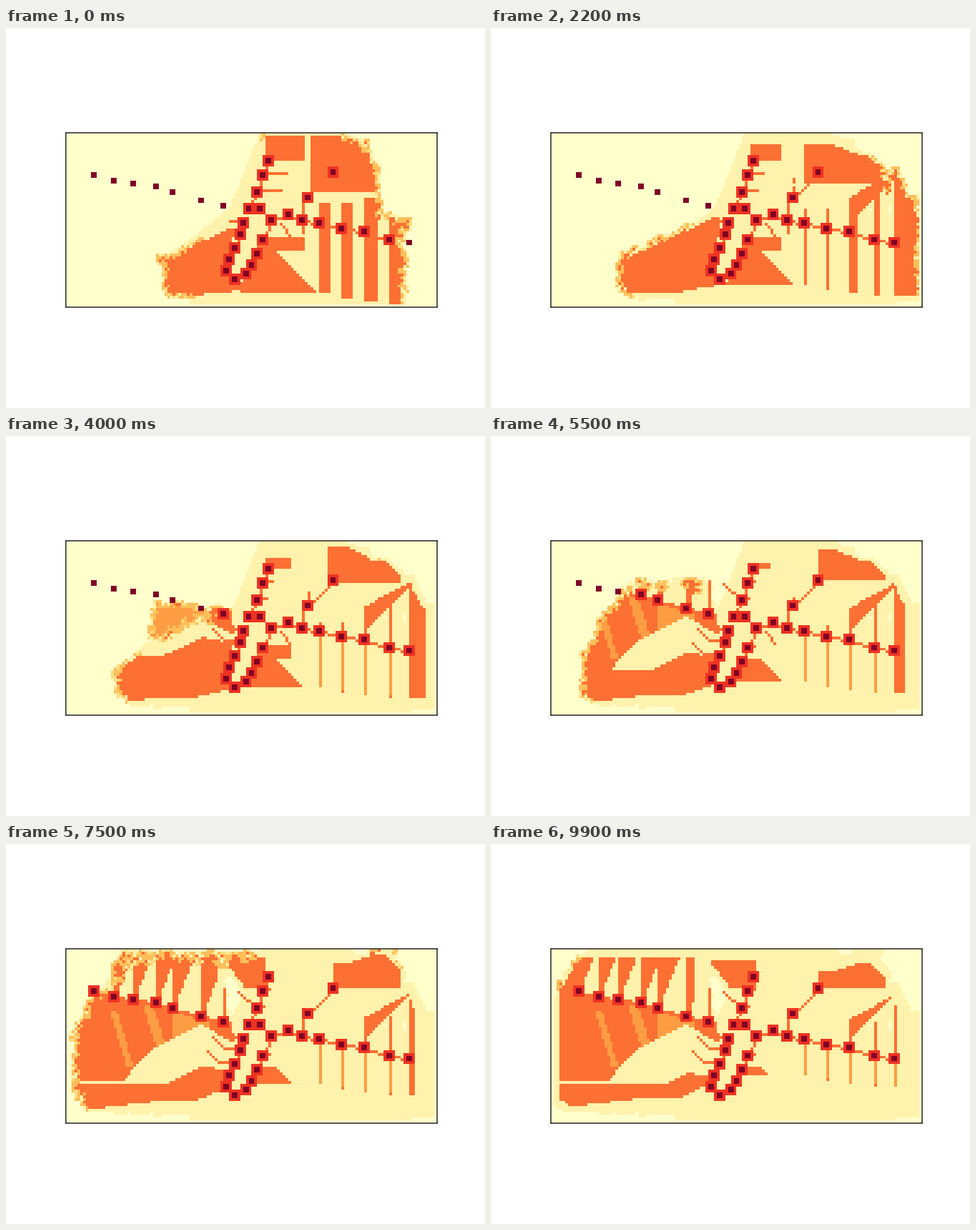
These frames come from a looping animation (840 px wide and 667 px high, 10 s). A matplotlib script:

```python
import matplotlib.pyplot as plt
import numpy as np
from matplotlib.animation import FuncAnimation

ROWS, COLS, FRAMES = 62, 132, 100
TRAIL, HALO, RIM, VEIN, BODY, RING, FOOD = 0.09, 2 / 9, 3 / 9, 4 / 9, 5 / 9, 0.69, 1
ERODE = 0.12  # cells per frame lost at a retreating edge

ROW, COL = np.mgrid[:ROWS, :COLS] + 0.5
interp, clip = np.interp, np.clip

# food sources: column and row of the upper left cell, in chain order
WEST = [(9, 14), (16, 16), (23, 17), (31, 18), (37, 20), (47, 23), (55, 25)]
NORTH = [(71, 9), (69, 14), (67, 20), (64, 26), (68, 26), (72, 30)]
LOOP = [(62, 31), (61, 35), (59, 40), (57, 44), (56, 48), (59, 51), (63, 49),
        (65, 46), (67, 42), (69, 37), (72, 30), (78, 28), (83, 30)]
EAST = [(89, 31), (97, 33), (105, 34), (114, 37), (121, 38)]
SPUR = [(85, 22), (94, 13)]
CHAINS = WEST, NORTH, LOOP + EAST, SPUR
NODES = sum(CHAINS, [])

STRIPE_TOPS = 25, 25, 23, 17, 11
STRIPE_WIDTHS = 3.6, 4, 5.5, 4.5, 11


def found(node):
    """Frame at which the organism reaches a food source."""
    if node in WEST:
        return 36 + 0.78 * (55 - node[0])
    return 5 if node == EAST[-1] else 0


def grow(mask):
    """Mask widened by one cell in all eight directions."""
    p = np.pad(mask, 1)
    tall = p[:-2] | p[1:-1] | p[2:]
    return tall[:, :-2] | tall[:, 1:-1] | tall[:, 2:]


def hollow_roof(c):
    return interp(c, [20, 30, 48, 59], [47.5, 36, 27, 33])


def west_lobe(c, r, t):
    """Foraging lobe on the left: whole sweep, and what is left of it."""
    retreat = max(0, 0.15 * (t - 85))
    left = max(34 - 0.4 * t, 1) + retreat
    top = max(14 - 0.6 * (t - 55), 1) + retreat

    age = t - clip((34 - c) / 0.4, 0, 85)
    floor = 57.8 - 0.05 * age - clip(c - 46, 0, None) * (0.1 + 0.004 * t)
    floor = floor - 0.8 * clip(4 - (c - left), 0, 4)
    end = interp(r, [35, 48, 53], [60, 56.5, 63])
    arm = (c > left) & (c < end) & (r < floor) & (r > clip(45 - 0.45 * (c - left), 30, 45))

    slant = left + 0.6 * clip(40 - 0.57 * (t - 55) - r, 0, None)
    chain = interp(c, *zip(*WEST)) + 1
    edge = np.where(r < chain, 57 - 0.13 * (t - 55), 59)
    dome = (c > slant) & (c > 57 - 3.2 * (t - 32)) & (c < edge) & (r > top) & (r < floor)
    sweep = arm | dome

    kept = (r > chain) | (c < 10)
    for n, m in WEST[:-1]:
        kept |= (c > n + 1) & (c < n + 2 + 0.4 * (m - r))
    if t >= 32:
        base = interp(c, [20, 35, 49, 59], [47.5, 47.5, 41, 43])
        base = np.minimum(base + 0.1 * (t - 68) - 0.4 * max(0, 50 - t), 47.5)
        kept &= (r < hollow_roof(c)) | (r > base)

    crest = (c > 69 - 0.75 * (21 - r)) & (c < min(73, 69 + 0.3 * (t - 68)))
    crest &= (r > top + 0.5) & (r < 14.5) & (t > 50)
    return sweep | crest, sweep & kept | crest


def inner_patches(c, r, t):
    """Remains around the loop, worn away from their free edges."""
    worn = ERODE * t
    patch = (c > 70.5) & (c < 85 - worn) & (r > 1 + worn) & (r < 10)
    left = interp(r, [37, 50, 57], [70, 64, 62])
    right = np.where(r < 42, 85 - worn, 77.5 + r - 45)
    wedge = (c > left) & (c < right) & (r < 57 - worn)
    return patch | wedge & (r > 37 + clip((t - 40) / 3, 0, 5))


def east_lobe(c, r, t):
    left, right = min(95, 87 + 0.14 * t), min(111 + 0.3 * t, 119)
    old_top = interp(t, [0, 30, 42, 99], [1, 5, 1, 8])
    new_top = interp(t, [0, 22, 55, 75, 99], [7, 8, 7, 2, 5])
    top = interp(c, [100, 110], [old_top, new_top]) + clip(c - right + 5, 0, 5)
    return (c > left) & (c < right) & (r > top) & (r < max(14, 21 - 0.15 * t))


def stripe_span(i, t):
    top = STRIPE_TOPS[i] + 0.1 * t + (0.6 * max(0, 22 - t) if i > 2 else 0)
    return min(top, EAST[i][1] - 1), 61 - 0.25 * (4 - i) ** 2 - ERODE * t


def stripes(c, r, t):
    body = np.zeros(c.shape, bool)
    for i, (n, _) in enumerate(EAST):
        top, bottom = stripe_span(i, t)
        width, lean = max(1, STRIPE_WIDTHS[i] - ERODE * t), 0
        if i == 4:
            width, lean = min(width, 0.6 * (t - 4)), 1.7
        x = c - n - 1
        body |= (x > 0) & (x < width) & (r > top + lean * x) & (r < bottom)
    x = c - 106
    band = (r > 23.5 - 0.55 * x + 0.03 * (t - 40)) & (r < 33 - x)
    return body | band & (x > 0) & (x < min(16, t - 5))


def stroke(grid, a, b, value=BODY):
    n = int(max(abs(b[0] - a[0]), abs(b[1] - a[1]))) + 1
    c = np.rint(np.linspace(a[0], b[0], n)).astype(int)
    r = np.rint(np.linspace(a[1], b[1], n)).astype(int)
    grid[r, c] = value


def draw_strands(grid, t):
    for i, (n, m) in enumerate(EAST):
        if i == 4 and t < 12:
            continue
        top, bottom = map(int, stripe_span(i, t))
        grid[top:bottom, n + 1] = BODY
        if t > (90 if i == 4 else 30):
            grid[m + 2:bottom, n + 1] = VEIN

    for n, m in (NORTH[1], NORTH[2], LOOP[9]):
        stroke(grid, (n + 2, m), (n + 2 + max(1, 7 - ERODE * t), m))
    for n, m in LOOP[:2]:
        stroke(grid, (n - 4, m), (n, m))
    if t >= 40:
        for n, m in LOOP[:3]:
            stroke(grid, (n - 9, m - 4), (n - 5, m))
            stroke(grid, (n - 5, m), (n, m))
    stroke(grid, (84, 24), (84, 31 if t > 35 else 35))
    if t < 60:
        stroke(grid, (76, 32), (79, 36))
    if 10 < t < 60:
        stroke(grid, (86, 14 + 0.1 * t), (86, 22))
    if t >= 55:
        stroke(grid, (61, 15), (67, 20))
        stroke(grid, (56, 14), (56, 25))


def draw_network(grid, t):
    draw_strands(grid, t)
    for chain in CHAINS:
        for a, b in zip(chain, chain[1:]):
            if t >= max(found(a), found(b)) and (chain is not SPUR or t > 12):
                stroke(grid, np.add(a, 1), np.add(b, 1))
    for n, m in NODES:
        if t >= found((n, m)):
            grid[m - 1:m + 3, n - 1:n + 3] = RING
    for n, m in NODES:
        grid[m:m + 2, n:n + 2] = FOOD


def vein_mask(t):
    roof = hollow_roof(COL)
    below = ROW > interp(COL, *zip(*WEST)) + 2
    if t < 46:
        return below & (COL > 30) & (COL < 52) & (ROW < roof)
    drift = COL - 0.3 * (ROW - 20)
    streak = (drift > 15) & (drift < 17.5) & (ROW > 22) & (ROW < 42)
    streak |= (drift > 27.5) & (drift < 31)
    fan = (COL > 38) & (COL < 51)
    return below & (ROW < roof) & (streak | fan)


def warp_field(rng):
    """Coarse bumps plus fine grain, in cells."""
    coarse = rng.normal(size=(ROWS, COLS))
    for axis in (0, 1, 0, 1):
        coarse = sum(np.roll(coarse, s, axis) for s in (-1, 0, 1)) / 3
    return coarse / coarse.std() * 0.8 + rng.uniform(-0.7, 0.7, (ROWS, COLS))


def simulate():
    rng = np.random.default_rng(7)
    dx, dy = warp_field(rng), warp_field(rng)
    trail = COL > interp(ROW, [0, 10, 27, 33, 45, 60], [69, 65, 58, 50, 35, 44])
    trail &= COL < interp(ROW, [0, 5, 14, 28, 31, 60], [100, 101, 112, 112, 119, 121])
    settled = ~grow(grow(~trail))
    inside = (ROW < ROWS - 1) & (COL > 1) & (COL < COLS - 1)
    trail &= inside

    history, frames = [], []
    for t in range(FRAMES):
        old = settled | history[t - 8] if t >= 8 else settled
        c, r = np.where(old, COL, COL + dx), np.where(old, ROW, ROW + dy)
        sweep, west = west_lobe(c, r, t)
        body = west | inner_patches(c, r, t) | east_lobe(c, r, t) | stripes(c, r, t)
        body &= inside
        reach = grow(body) & inside
        trail = trail | reach | sweep & inside
        history.append(trail)

        chance = rng.random((ROWS, COLS))
        grid = np.where(trail, TRAIL, 0.0)
        rim = reach & ~body & ~old
        grid[rim & (chance < 0.7)] = HALO
        grid[rim & (chance < 0.45)] = RIM
        grid[body] = BODY
        if t >= 32:
            grid[west & body & vein_mask(t)] = VEIN
        grid[body & ~old & grow(~body) & (chance < 0.5)] = RIM
        draw_network(grid, t)
        frames.append(grid)
    return frames


frames = simulate()
plt.rcParams["axes.linewidth"] = 1.12
fig, ax = plt.subplots(figsize=(8.4, 6.67), dpi=100)
ax.set(xticks=[], yticks=[])
image = ax.imshow(frames[0], cmap="YlOrRd", vmin=0, vmax=1)


def update(t):
    image.set_data(frames[t])
    return (image,)


anim = FuncAnimation(fig, update, frames=FRAMES, interval=100, repeat=True, repeat_delay=0)
plt.show()
```
